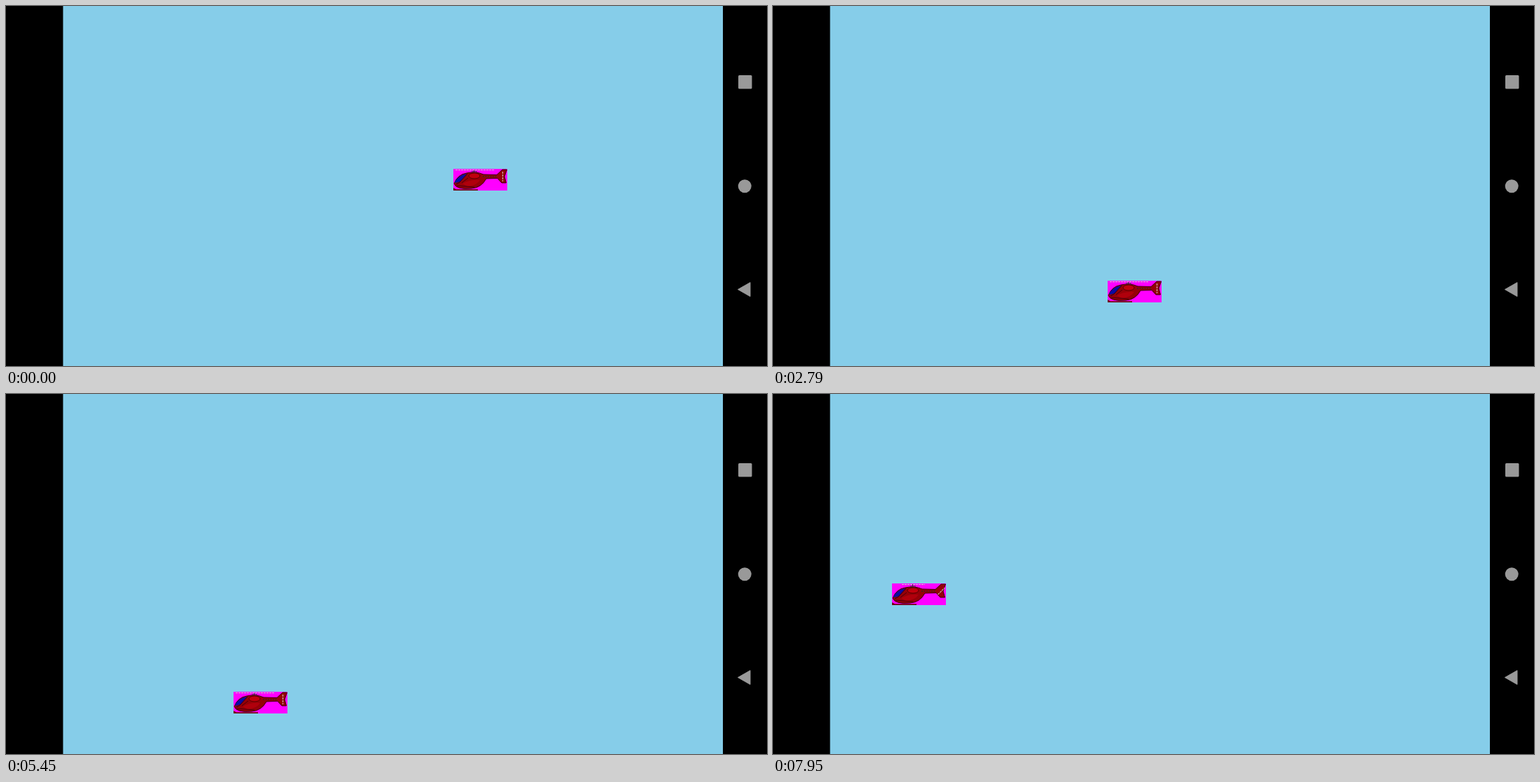
An HTML page for the animation above (8 s loop, 1087 by 515 pixels).

```html
<!DOCTYPE html>
<html lang="en">
<head>
<meta charset="utf-8">
<title>Helicopter</title>
<style>
html, body { margin: 0; width: 100%; height: 100%; overflow: hidden; background: #000; }
svg { display: block; width: 1087px; height: 515px; }
</style>
</head>
<body>
<svg viewBox="0 0 1087 515">
  <rect x="81.5" width="942.5" height="515" fill="#86cde9"/>
  <g id="heli">
    <rect width="77" height="31" fill="#f0f"/>
    <path d="M0 31V27L4 29.3H35V31Z" fill="#700010"/>
    <path d="M1 21Q6 8 19 6Q32 3 43 8L62 8.5L70 1H76.5L73 11L75.5 20H69L63 13.5L47 14Q40 27 26 28Q4 30 1 21Z" fill="#960008" stroke="#380008"/>
    <path d="M2 19Q7 9 19 7L10 18L3 20Z" fill="#0a0aa4"/>
    <path d="M20 7L9 19L4 22" stroke="#200020" fill="none"/>
    <ellipse cx="30" cy="10" rx="8" ry="4" fill="#c0000c" stroke="#500"/>
    <path d="M13 21Q24 15 38 16Q33 24 20 25Z" fill="#b0000c"/>
    <path d="M12 20L21 13M5 24L30 26" stroke="#480008"/>
    <path d="M42 11H63" stroke="#482018" stroke-width="2" stroke-dasharray="2 1.5"/>
    <path d="M29.5 1V5M26 4H34" stroke="#333"/>
    <path id="rotor" d="M3 1.5H58" stroke="#ccc" stroke-dasharray="3 1"/>
    <path id="tail" d="M70.5 4V18" stroke="#c8b8a8" stroke-width="1.2" stroke-dasharray="3 1"/>
  </g>
  <g fill="#999">
    <rect x="1046" y="99" width="19.5" height="19.5" rx="1.5"/>
    <circle cx="1055.2" cy="257.8" r="9.5"/>
    <path d="M1045.5 405.5L1063 395.5V415.5Z" stroke="#999" stroke-linejoin="round"/>
  </g>
</svg>
<script>
const get = id => document.getElementById(id);
const heli = get("heli"), rotor = get("rotor"), tail = get("tail");

const loop = 8000, fps = 24, speed = 0.062;
const start = { x: 638.5, y: 232.5 }, floor = 486;
const stalls = [[1080, 200], [3200, 100], [5330, 100]]; // start, length in ms

function travel(t) {
  const lost = stalls.reduce((sum, [at, len]) => sum + Math.min(len, Math.max(0, t - at)), 0);
  return (t - lost) * speed;
}

function draw(now) {
  const tick = Math.floor((now % loop + 9) * fps / 1000) % (loop * fps / 1000);
  const way = travel(tick * 1000 / fps);

  // Diagonal flight that bounces off the floor
  const x = Math.round(start.x - way);
  const y = Math.round(floor - Math.abs(floor - start.y - way));
  heli.setAttribute("transform", `translate(${x} ${y})`);

  const phase = Math.floor((tick / 4.2 + 0.05) % 1 * 4);
  const short = phase > 1;
  rotor.setAttribute("d", short ? "M14 1.5H47" : "M3 1.5H58");
  tail.setAttribute("transform", `rotate(${phase * 90 + short * 45} 70.5 11)`);
}

function play() {
  draw(performance.now());
  requestAnimationFrame(play);
}
play();
</script>
</body>
</html>
```
